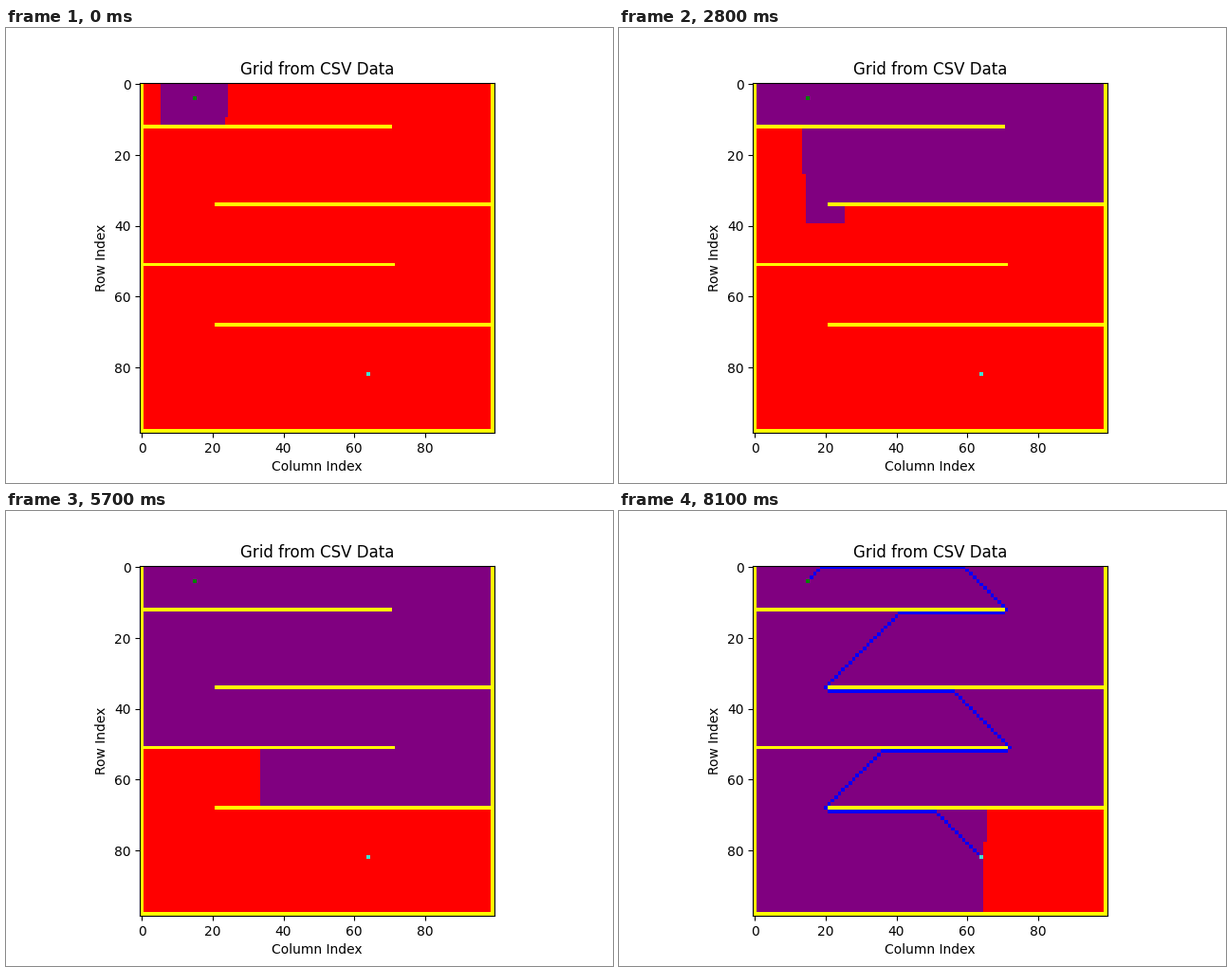
Recreate the animation shown at these times as a matplotlib script. Size 640 px wide and 480 px high, loop 8.4 s.

```python
from itertools import product

import matplotlib.pyplot as plt
import numpy as np
from matplotlib.animation import FuncAnimation
from matplotlib.colors import ListedColormap

ROWS, COLS = 99, 100
START, GOAL = (4, 15), (82, 64)
FIRST_POPS, POPS_PER_FRAME = 200, 100
SEARCH_FRAMES, TOTAL_FRAMES = 82, 84

FREE, WALL, SEEN, PATH, BEGIN, END = range(6)
COLORS = ["red", "yellow", "purple", "blue", "green", "turquoise"]


def build_maze():
    maze = np.full((ROWS, COLS), FREE)
    maze[:, [0, -1]] = WALL
    maze[-1] = WALL
    maze[12, :71] = WALL
    maze[34, 21:] = WALL
    maze[51, :72] = WALL
    maze[68, 21:] = WALL
    return maze


def search(maze):
    """Breadth-first search; note after how many visits each cell was found."""
    found_at = np.full(maze.shape, np.inf)
    found_at[START] = 0
    parent = {START: None}
    queue = [START]
    for visits, (row, col) in enumerate(queue, 1):
        for dr, dc in product((-1, 0, 1), repeat=2):
            cell = r, c = row + dr, col + dc
            inside = 0 <= r < ROWS and 0 <= c < COLS
            if inside and maze[cell] != WALL and cell not in parent:
                parent[cell] = (row, col)
                found_at[cell] = visits
                queue.append(cell)
    return found_at, parent


def trace(parent, cell):
    while cell is not None:
        yield cell
        cell = parent[cell]


maze = build_maze()
found_at, parent = search(maze)
route = list(trace(parent, GOAL))


def grid_at(frame):
    step = min(frame, SEARCH_FRAMES - 1)
    grid = maze.copy()
    grid[found_at <= FIRST_POPS + POPS_PER_FRAME * step] = SEEN
    if step == SEARCH_FRAMES - 1:
        for cell in route:
            grid[cell] = PATH
    grid[START], grid[GOAL] = BEGIN, END
    return grid


fig, ax = plt.subplots(figsize=(6.4, 4.8), dpi=100)
image = ax.imshow(grid_at(0), cmap=ListedColormap(COLORS), vmin=-0.5,
                  vmax=len(COLORS) - 0.5, interpolation="nearest")
ax.set_title("Grid from CSV Data")
ax.set_xlabel("Column Index")
ax.set_ylabel("Row Index")


def update(frame):
    image.set_data(grid_at(frame))
    return [image]


anim = FuncAnimation(fig, update, frames=TOTAL_FRAMES, interval=100,
                     repeat=True, repeat_delay=0)
plt.show()
```
